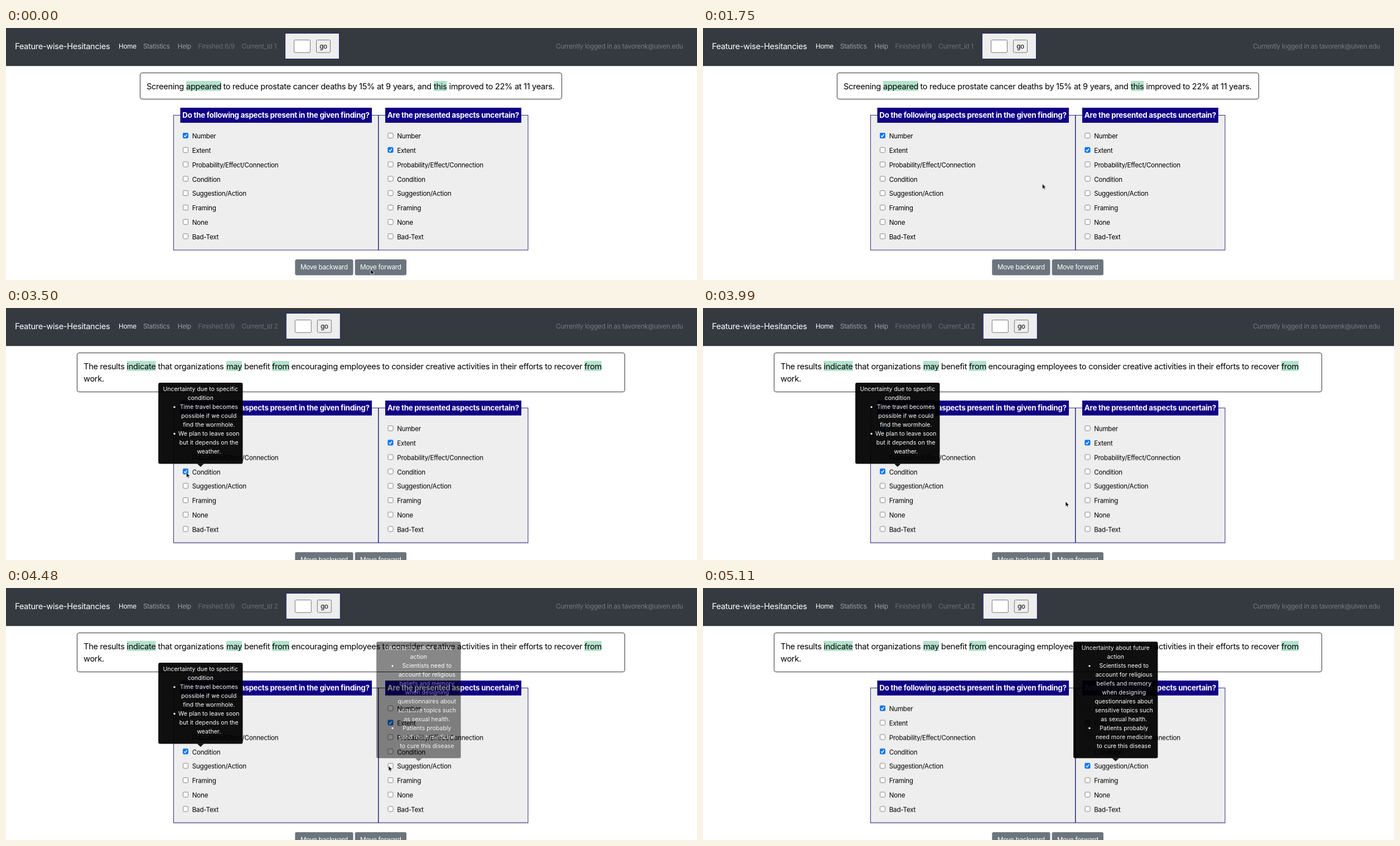
An HTML page for the animation above (5950 ms loop, 1239 by 452 pixels).

```html
<!DOCTYPE html>
<html lang="en">
<head>
<meta charset="utf-8">
<title>Aspect annotation</title>
<style>
html, body { margin: 0; width: 100%; height: 100%; overflow: hidden; background: #fff; }
svg { display: block; width: 1239px; height: 452px; }
text { font: 11.7px Inter, "Open Sans", sans-serif; letter-spacing: -.022em; white-space: pre; }
.big { font-size: 14.65px; }
.legend { font-size: 13.45px; font-weight: 700; fill: #fff; }
.light { fill: #fff; }
.link { fill: #9a9da0; }
.dim { fill: #6c7075; }
.user { fill: #787c81; }
.hl { fill: #b3e2cd; }
.frame { fill: #fff; stroke: #333; }
.panel { fill: #eee; stroke: #1c1670; stroke-width: .9; }
.field { fill: #fff; stroke: #767676; }
.tip text { font-size: 10.5px; letter-spacing: .002em; fill: #fff; text-anchor: middle; }
.tip circle { fill: #fff; }

/* Hard cuts by default; moving stretches advance every 70 ms. */
.anim { animation: 5950ms step-end infinite; }
#first { animation-name: first; }
#second { animation-name: second; }
#form { animation-name: form; }
#jump { animation-name: jump; }
#tick-condition { animation-name: tick-condition; }
#tick-action { animation-name: tick-action; }
#tip-condition { animation-name: tip-condition; }
#tip-framing { animation-name: tip-framing; }
#tip-action { animation-name: tip-action; }
#cursor { animation-name: cursor; }

@keyframes first { 0% { opacity: 1 } 32.94%, to { opacity: 0 } }
@keyframes second { 0% { opacity: 0 } 32.94%, to { opacity: 1 } }
@keyframes form { 0% { transform: none } 32.94%, to { transform: translateY(22.7px) } }
@keyframes jump { 0% { transform: none } 32.94%, to { transform: translateX(1.8px) } }
@keyframes tick-condition { 0% { opacity: 0 } 56.47%, to { opacity: 1 } }
@keyframes tick-action { 0% { opacity: 0 } 81.17%, to { opacity: 1 } }
@keyframes tip-condition {
  0% { opacity: 0 }
  51.76% { opacity: 0; animation-timing-function: steps(2) }
  54.11% { opacity: .94 }
  78.82% { opacity: .94; animation-timing-function: steps(2) }
  81.17%, to { opacity: 0 }
}
@keyframes tip-framing {
  0% { opacity: 0 }
  68.23% { opacity: 0; animation-timing-function: steps(2) }
  70.58% { opacity: .94 }
  71.76% { opacity: .94; animation-timing-function: steps(2) }
  74.11% { opacity: 0 }
  83.52% { opacity: .3 }
  85.88%, to { opacity: 0 }
}
@keyframes tip-action {
  0% { opacity: 0 }
  74.11% { opacity: 0; animation-timing-function: steps(2) }
  76.47%, to { opacity: .94 }
}
@keyframes cursor {
  0% { transform: translate(654px, 433px) }
  1.17% { transform: translate(653px, 341px) }
  3.52% { transform: translate(653px, 341px); animation-timing-function: steps(3) }
  7.05% { transform: translate(618px, 292px); animation-timing-function: steps(2) }
  9.41% { transform: translate(596px, 268px) }
  10.58% { transform: translate(608.5px, 279.5px) }
  37.64% { transform: translate(608.5px, 279.5px); animation-timing-function: steps(5) }
  43.52% { transform: translate(400px, 300px); animation-timing-function: steps(4) }
  48.23% { transform: translate(327px, 305px) }
  49.41% { transform: translate(325px, 302.5px); animation-timing-function: steps(3) }
  52.94% { transform: translate(322px, 294px); animation-timing-function: steps(5) }
  58.82% { transform: translate(323.5px, 295px) }
  61.17% { transform: translate(323.5px, 295px); animation-timing-function: steps(5) }
  67.05% { transform: translate(650px, 347px) }
  68.23% { transform: translate(689px, 352px); animation-timing-function: steps(3) }
  71.76% { transform: translate(688.5px, 333px); animation-timing-function: steps(3) }
  75.29% { transform: translate(686px, 319px) }
  83.52% { transform: translate(690px, 342px) }
  84.70% { transform: translate(699px, 404px) }
  85.88%, to { transform: translate(699px, 480px) }
}
</style>
</head>
<body>
<svg viewBox="0 0 1239 452">
  <rect width="1239" height="68.2" fill="#343a40"/>
  <text class="big light" x="16" y="38.3">Feature-wise-Hesitancies</text>
  <text class="light" x="202" y="37.4">Home</text>
  <text class="link" x="246" y="37.4">Statistics</text>
  <text class="link" x="307.5" y="37.4">Help</text>
  <text class="dim" x="344.5" y="37.4">Finished 6/9</text>
  <text class="user" x="986" y="37.4">Currently logged in as tavorenk@ulven.edu</text>
  <g id="jump" class="anim">
    <rect class="panel" x="500.5" y="9.5" width="97" height="46"/>
    <rect class="field" x="516.5" y="21.5" width="29" height="22.5" rx="2"/>
    <rect class="field" x="556.5" y="21.5" width="25" height="22.5" rx="2" style="fill:#efefef"/>
    <text x="569" y="37" text-anchor="middle">go</text>
  </g>
  <g id="first" class="anim"></g>
  <g id="second" class="anim"></g>
  <g id="form" class="anim"></g>
  <g id="tips"></g>
  <path id="cursor" class="anim" d="M0 0V9.2L2.1 7.3 3.5 10.4 5 9.8 3.7 6.8H6.5Z" stroke="#fff" stroke-width=".7"/>
</svg>
<script>
const $ = id => document.getElementById(id);

function add(parent, tag, attrs, text) {
  const el = document.createElementNS("http://www.w3.org/2000/svg", tag);
  for (const key in attrs) el.setAttribute(key, attrs[key]);
  if (text) el.textContent = text;
  parent.append(el);
  return el;
}
const box = (parent, x, y, width, height, attrs) =>
  add(parent, "rect", { x, y, width, height, ...attrs });
const label = (parent, x, y, text, attrs) =>
  add(parent, "text", { x, y, ...attrs }, text);

// Sentence parts are [x, text] or, when highlighted, [x, text, width].
function sentence(parent, id, x, width, height, parts) {
  label(parent, 422.5, 37.4, "Current_id " + id, { class: "dim" });
  box(parent, x, 80.5, width, height, { class: "frame", rx: 3.5 });
  for (const [left, text, mark] of parts) {
    if (mark) box(parent, left, 95, mark, 18, { class: "hl" });
    label(parent, left, 109.5, text, { class: "big" });
  }
}
sentence($("first"), 1, 240.5, 756, 47, [
  [252, "Screening"], [323, "appeared", 63],
  [389.5, "to reduce prostate cancer deaths by 15% at 9 years, and"],
  [767, "this", 23.5], [794.5, "improved to 22% at 11 years."]
]);
sentence($("second"), 2, 127.5, 982, 70, [
  [139, "The results"], [216.5, "indicate", 52], [272.5, "that organizations"],
  [395, "may", 28], [427, "benefit"], [477, "from", 31],
  [511.5, "encouraging employees to consider creative activities in their efforts to recover"],
  [1037, "from", 31]
]);
label($("second"), 139, 132.3, "work.", { class: "big" });

const form = $("form");
const aspects = ["Number", "Extent", "Probability/Effect/Connection", "Condition",
  "Suggestion/Action", "Framing", "None", "Bad-Text"];
const rowY = i => 193 + i * 25.8;

function tick(x, row, attrs) {
  const g = add(form, "g", attrs);
  const y = rowY(row);
  box(g, x - 5, y - 5, 9.8, 9.8, { rx: 1.8, fill: "#0075ff" });
  add(g, "path", { d: `M${x - 2.8} ${y}l2 2.2 3.4-4.6`, fill: "none", stroke: "#fff", "stroke-width": 1.5 });
}
function column(x, width, title, titleWidth) {
  box(form, x, 156.5, width, 241.7, { class: "panel" });
  box(form, x + 12, 143, titleWidth, 27, { fill: "#110084" });
  label(form, x + 15.8, 161.3, title, { class: "legend" });
  aspects.forEach((name, i) => {
    box(form, x + 17, rowY(i) - 4.5, 9, 9, { class: "field", rx: 1.7, "stroke-width": .9 });
    label(form, x + 33.2, rowY(i) + 5.1, name);
  });
}
column(300.5, 367, "Do the following aspects present in the given finding?", 343.5);
column(668, 268, "Are the presented aspects uncertain?", 244);
tick(322, 0);
tick(689.5, 1);
tick(322, 3, { id: "tick-condition", class: "anim" });
tick(689.5, 4, { id: "tick-action", class: "anim" });

function button(x, width, text) {
  box(form, x, 415, width, 28.5, { rx: 3, fill: "#6c757d" });
  label(form, x + width / 2, 433.4, text, { class: "light", "text-anchor": "middle" });
}
button(518.3, 104.2, "Move backward");
button(625.7, 92.3, "Move forward");

// Heading lines are centred; list lines sit further right, "*" starts an item.
function tip(id, cx, top, heading, list) {
  const g = add($("tips"), "g", { id: "tip-" + id, class: "anim tip" });
  const pitch = 15.93;
  const height = (heading.length + list.length) * pitch + 18;
  const bottom = top + height;
  box(g, cx - 75.7, top, 151.4, height, { rx: 3 });
  add(g, "path", { d: `M${cx - 6} ${bottom - .2}h12l-6 5.7z` });
  let y = top + 15.2;
  for (const line of heading) {
    label(g, cx, y, line);
    y += pitch;
  }
  for (const line of list) {
    if (line[0] === "*") add(g, "circle", { cx: cx - 46.8, cy: y - 3.4, r: 1.7 });
    label(g, cx + 15, y, line.replace("*", ""));
    y += pitch;
  }
}
tip("condition", 348.8, 134, ["Uncertainty due to specific", "condition"], [
  "*Time travel becomes", "possible if we could", "find the wormhole.",
  "*We plan to leave soon", "but it depends on the", "weather."
]);
tip("action", 739.8, 96.2, ["Uncertainty about future", "action"], [
  "*Scientists need to", "account for religious", "beliefs and memory", "when designing",
  "questionnaires about", "sensitive topics such", "as sexual health.",
  "*Patients probably", "need more medicine", "to cure this disease"
]);
tip("framing", 712.5, 170, ["Uncertainty directly", "expressed by the authors or", "the journalists"], [
  "*We found that ...", "*We estimate that ...", "*This study suggests", "that ...",
  "*We are uncertain that", "..."
]);
</script>
</body>
</html>
```
